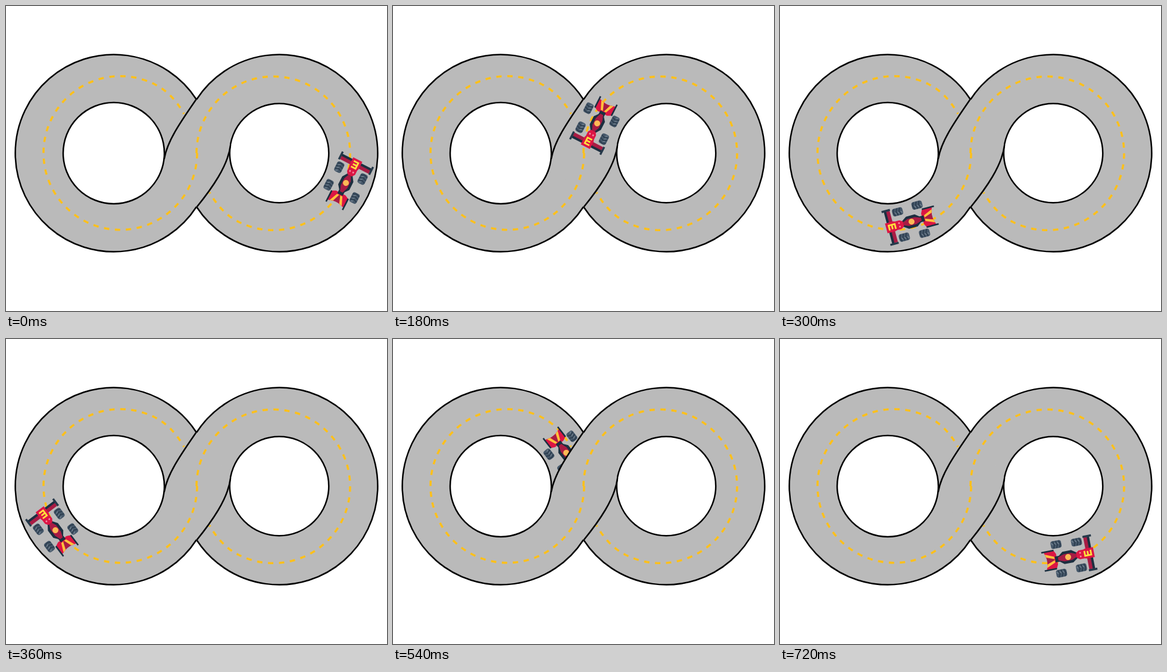
These frames come from a looping animation (640 px wide and 512 px high, 780 ms). An HTML page:

```html
<!DOCTYPE html>
<html lang="en">
<head>
<meta charset="utf-8">
<title>Figure-eight race</title>
<style>
  html, body { margin: 0; width: 100%; height: 100%; overflow: hidden; background: #fff; }
  svg { display: block; width: 640px; height: 512px; }
  .line { fill: none; stroke: #000; stroke-width: 2.5; stroke-linecap: round; }
  .hole { fill: #fff; stroke: #000; stroke-width: 2.5; }
  .road { fill: #bababa; }
  .dash { fill: none; stroke: #fdc01c; stroke-width: 3.6; stroke-dasharray: 9 9.4; }
  .navy { fill: #1c2f40; }
  .red { fill: #dc1644; }
  .dark { fill: #a81c44; }
  .gold { fill: #fdc23c; }
</style>
</head>
<body>
<svg id="stage" viewBox="0 0 640 512">
  <defs>
    <path id="deck" d="M320 156C298 188 271 225 266 256L320 338C346 306 373 268 377 234Z"/>
    <clipPath id="deckClip"><use href="#deck"/></clipPath>
    <g id="lane" class="dash">
      <path d="M321 247A129 129 0 1 1 250 131.5Q279 146 299 181"/>
      <path d="M320 247A129 129 0 1 1 391 362.5Q362 348 342 313"/>
    </g>
    <g id="wheel">
      <rect x="-9" y="-6.5" width="18" height="13" rx="4" fill="#46586a"/>
      <path d="M-5 -6L-2.5 0L-5 6M0 -6L2.5 0L0 6M5 -6L7.5 0L5 6" fill="none" stroke="#2b3c4d" stroke-width="1.7"/>
      <path d="M-7.5 -3.5L-5.5 0M-2.5 -3.5L-.5 0M2.5 -3.5L4.5 0" stroke="#7d8c99" stroke-width="1.2"/>
    </g>
  </defs>

  <path class="road" d="M320 157A165.5 165.5 0 1 0 320 337A165.5 165.5 0 1 0 320 157Z"/>
  <use href="#lane"/>
  <circle class="hole" cx="181" cy="247" r="85"/>
  <circle class="hole" cx="459" cy="247" r="83.2"/>
  <path class="line" d="M320 157A165.5 165.5 0 1 0 320 337A165.5 165.5 0 1 0 320 157Z"/>

  <g id="bridge">
    <use href="#deck" class="road"/>
    <g clip-path="url(#deckClip)"><use href="#lane"/></g>
    <path class="line" d="M320 156C298 188 271 225 266 256M320 338C346 306 373 268 377 234"/>
  </g>

  <g id="car">
    <use href="#wheel" x="-16" y="-24.5"/>
    <use href="#wheel" x="-16" y="24.5"/>
    <use href="#wheel" x="18.5" y="-22"/>
    <use href="#wheel" x="18.5" y="22"/>
    <!-- front wing -->
    <path class="dark" d="M31 -27H38V27H31Z"/>
    <path class="navy" d="M37 -28H41V28H37Z"/>
    <path d="M30 -28.5H44.5M30 28.5H44.5" stroke="#26394a" stroke-width="3.4"/>
    <!-- rear wing -->
    <path class="red" d="M-39 -15H-22L-19 -9V9L-22 15H-39L-35 0Z"/>
    <path class="dark" d="M-36 -5L-24 -2V2L-36 5Z"/>
    <path class="gold" d="M-38 -11.5L-23 -5V-1L-36.5 -6ZM-38 11.5L-23 5V1L-36.5 6Z"/>
    <path d="M-43 -15.5H-22M-43 15.5H-22" stroke="#1c2f40" stroke-width="2.6"/>
    <!-- body -->
    <path class="navy" d="M-22 -5L-15 -5L-8 -10.5H7L15 -5H20V5H15L7 10.5H-8L-15 5H-22Z"/>
    <path class="dark" d="M-17 -2.5L-7 -6H6L14 -2.5V2.5L6 6H-7L-17 2.5Z"/>
    <path class="red" d="M14 -4L19 -7.5H27L30 -8.5H44V8.5H30L27 7.5H19L14 4Z"/>
    <circle r="5" fill="#fdba55"/>
    <circle cx="21" cy="-3" r="1.5" fill="#f58ba3"/>
    <circle cx="21" cy="3" r="1.5" fill="#f58ba3"/>
    <path d="M28.5 -5V3.5H39V-5M33.7 -4V3.5" fill="none" stroke="#ffe03c" stroke-width="2.8"/>
  </g>
</svg>
<script>
  const STEP = 60;
  // x, y, heading in degrees, 1 when below the bridge
  const poses = [
    [571, 297, -63, 0],
    [561, 178, -125, 0],
    [447, 124, 175, 0],
    [343, 197, 117, 0],
    [300, 291, 119, 0],
    [221, 362, 165, 0],
    [83, 321, 233, 0],
    [78, 174, -58, 0],
    [190, 124, 4, 0],
    [291, 191, 52, 1],
    [338, 276, 60, 1],
    [394, 347, 35, 1],
    [484, 366, -11, 0]
  ];
  const stage = document.getElementById('stage');
  const bridge = document.getElementById('bridge');
  const car = document.getElementById('car');
  let start = null, shown = -1;

  function show(i) {
    const [x, y, angle, below] = poses[i];
    car.setAttribute('transform', `translate(${x} ${y}) rotate(${angle})`);
    stage.insertBefore(car, below ? bridge : null);
    shown = i;
  }

  function tick(now) {
    start ??= now;
    const i = Math.floor((now - start) / STEP) % poses.length;
    if (i !== shown) show(i);
    requestAnimationFrame(tick);
  }

  show(0);
  requestAnimationFrame(tick);
</script>
</body>
</html>
```
